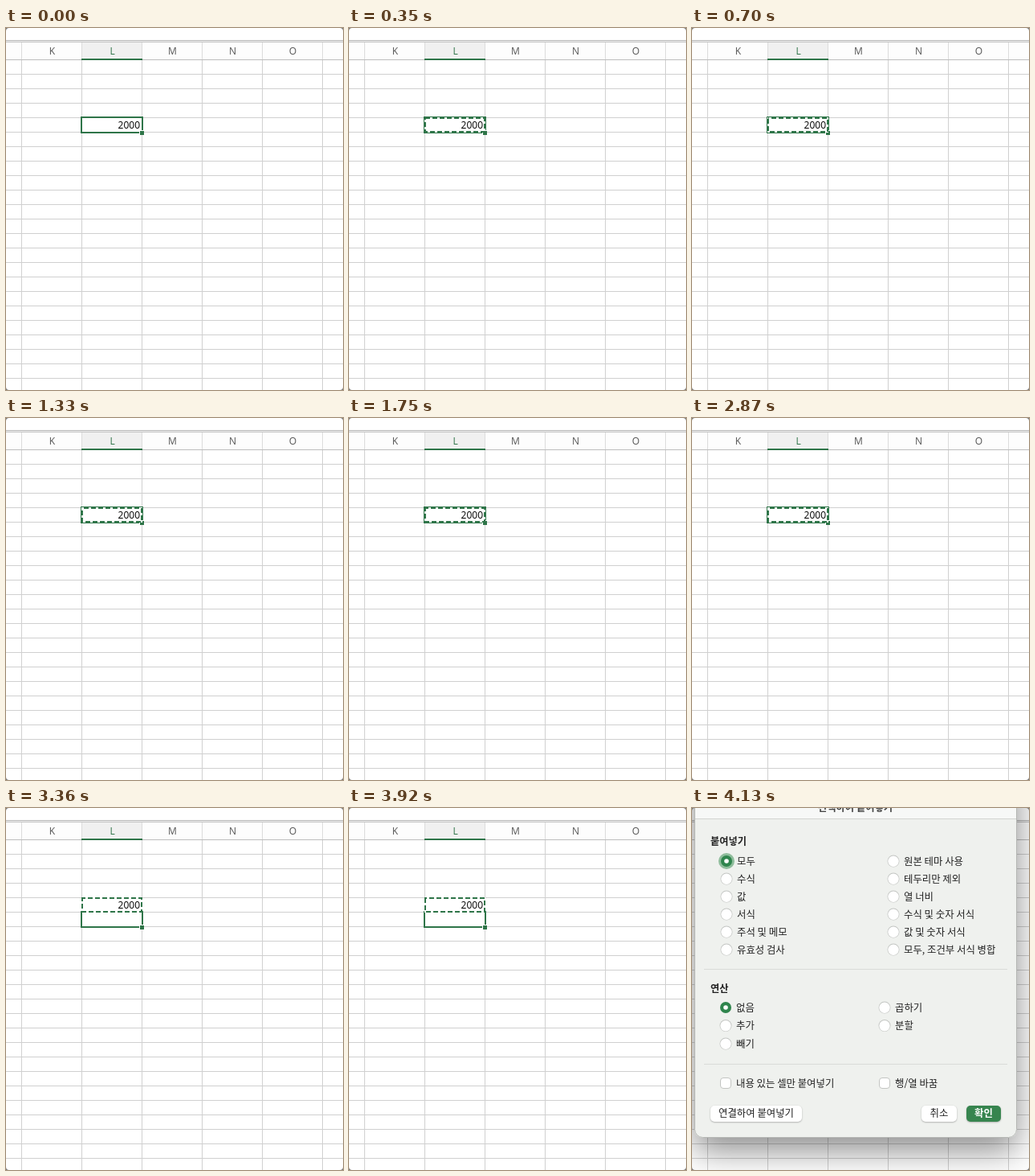
These frames come from a looping animation (420x450 px, 4.76 s). An HTML page with a canvas:

```html
<!DOCTYPE html>
<html lang="ko">
<head>
<meta charset="utf-8">
<style>
html, body { margin: 0; width: 100%; height: 100%; overflow: hidden; background: #fff; }
canvas { display: block; }
</style>
</head>
<body>
<canvas id="stage" width="420" height="450"></canvas>
<script>
const ctx = document.getElementById('stage').getContext('2d');
const LOOP = 4760, FRAME = 70;
const COPY_AT = 280, MOVE_AT = 3360, DIALOG_AT = 4130;
const GREEN = '#2f7549';
const LATIN = '"Open Sans", "Noto Sans", sans-serif';
const KOREAN = '"Noto Sans CJK KR", "Noto Sans CJK", sans-serif';

// Bursts of the marching border: start time, number of steps
const BURSTS = [
  [280, 4], [630, 4], [980, 4], [1330, 5], [1750, 4], [2100, 3],
  [2380, 4], [2730, 4], [3080, 4], [3430, 5], [3850, 2]
];

function rect(x, y, w, h, color) {
  ctx.fillStyle = color;
  ctx.fillRect(x, y, w, h);
}

function label(str, x, y, font, color, align = 'left') {
  ctx.font = font;
  ctx.fillStyle = color;
  ctx.textAlign = align;
  ctx.fillText(str, x, y);
}

function roundBox(x, y, w, h, r, fill, stroke) {
  ctx.beginPath();
  ctx.roundRect(x, y, w, h, r);
  ctx.fillStyle = fill;
  ctx.fill();
  if (stroke) {
    ctx.strokeStyle = stroke;
    ctx.lineWidth = 1;
    ctx.stroke();
  }
}

function disc(x, y, r, color) {
  ctx.beginPath();
  ctx.arc(x, y, r, 0, Math.PI * 2);
  ctx.fillStyle = color;
  ctx.fill();
}

function withShadow(color, blur, dy, draw) {
  ctx.save();
  ctx.shadowColor = color;
  ctx.shadowBlur = blur;
  ctx.shadowOffsetY = dy;
  draw();
  ctx.restore();
}

function drawSheet() {
  rect(0, 0, 420, 450, '#fff');
  rect(0, 15, 420, 1, '#b9b9b9');
  rect(0, 16, 420, 1, '#ededed');
  rect(0, 17, 420, 1, '#c4c4c4');
  rect(0, 18, 420, 21, '#fdfdfd');
  rect(95, 18, 74, 20, '#f0f0f0');
  for (let x = 19; x < 420; x += 75) {
    rect(x, 18, 1, 21, '#dcdcdc');
    rect(x, 40, 1, 410, '#d0d0d0');
  }
  rect(0, 39, 420, 1, '#bdbdbd');
  for (let y = 57; y < 450; y += 18) rect(0, y, 420, 1, '#d0d0d0');
  rect(94, 38, 76, 2, GREEN);
  [...'KLMNO'].forEach((c, i) =>
    label(c, 57.5 + i * 75, 33, '12px ' + LATIN, c === 'L' ? GREEN : '#555', 'center'));
  label('2000', 167, 125, '12px ' + LATIN, '#000', 'right');
}

function drawSelection(y) {
  ctx.strokeStyle = GREEN;
  ctx.lineWidth = 2;
  ctx.strokeRect(94, y, 76, 19);
  rect(166, y + 16, 6, 6, '#fff');
  rect(167, y + 17, 5, 5, GREEN);
}

function drawAnts(step) {
  ctx.lineWidth = 2;
  ctx.strokeStyle = '#fff';
  ctx.strokeRect(95, 112, 74, 17);
  ctx.strokeStyle = GREEN;
  ctx.setLineDash([6, 3]);
  ctx.lineDashOffset = -(step + 7);
  ctx.strokeRect(95, 112, 74, 17);
  ctx.setLineDash([]);
}

function drawCorners() {
  ctx.beginPath();
  ctx.rect(0, 0, 420, 450);
  ctx.roundRect(0, 0, 420, 450, 4);
  ctx.fillStyle = '#777';
  ctx.fill('evenodd');
}

function text(str, x, y, bold) {
  label(str, x, y + 4.5, (bold ? 'bold 12.2px ' : '12.4px ') + KOREAN, '#222');
}

function radio(x, y, str, on, focus) {
  if (focus) disc(x, y, 10, '#8fbd9c');
  if (on) {
    disc(x, y, 7, '#2f854d');
    disc(x, y, 2.8, '#fff');
  } else {
    disc(x, y, 7.5, '#c3c5c2');
    disc(x, y + 0.2, 6.7, '#fff');
  }
  text(str, x + 13, y);
}

function checkbox(x, y, str) {
  roundBox(x + 0.5, y - 6.5, 13, 13, 3.5, '#fff', '#c3c5c2');
  text(str, x + 20, y);
}

function button(x, w, str, fill, color, weight = '') {
  withShadow('rgba(0,0,0,.3)', 2, 0.7, () => roundBox(x, 370, w, 20, 5, fill));
  label(str, x + w / 2, 384.2, weight + '12.4px ' + KOREAN, color, 'center');
}

function drawDialog() {
  withShadow('rgba(0,0,0,.45)', 42, 16, () =>
    roundBox(3, -60, 402, 470, 10, '#eff1ee'));
  roundBox(3.5, -60, 401, 469.5, 10, '#eff1ee', '#b5b7b4');
  rect(4, 0, 400, 13, '#f7f8f7');
  rect(4, 13, 400, 1, '#d3d5d2');
  label('선택하여 붙여넣기', 203.5, 3.5, 'bold 12.3px ' + KOREAN, '#444', 'center');

  text('붙여넣기', 23, 41, true);
  ['모두', '수식', '값', '서식', '주석 및 메모', '유효성 검사']
    .forEach((s, i) => radio(43, 66 + i * 22, s, i === 0, i === 0));
  ['원본 테마 사용', '테두리만 제외', '열 너비', '수식 및 숫자 서식',
    '값 및 숫자 서식', '모두, 조건부 서식 병합']
    .forEach((s, i) => radio(251, 66 + i * 22, s));
  rect(15, 200, 378, 1, '#d9dbd8');

  text('연산', 23, 224, true);
  ['없음', '추가', '빼기'].forEach((s, i) => radio(42, 248 + i * 22.5, s, i === 0));
  ['곱하기', '분할'].forEach((s, i) => radio(240, 248 + i * 22.5, s));
  rect(15, 318, 378, 1, '#d9dbd8');

  checkbox(35, 342, '내용 있는 셀만 붙여넣기');
  checkbox(233, 342, '행/열 바꿈');
  button(23, 114, '연결하여 붙여넣기', '#fff', '#222');
  button(286, 44, '취소', '#fff', '#222');
  button(342, 43, '확인', '#37854f', '#fff', 'bold ');
}

function stepAt(t) {
  return BURSTS.reduce((sum, [start, n]) =>
    sum + Math.max(0, Math.min(n, Math.floor((t - start) / FRAME) + 1)), 0);
}

function render() {
  const t = performance.now() % LOOP;
  drawSheet();
  drawSelection(t < MOVE_AT ? 111 : 129);
  if (t >= COPY_AT) drawAnts(stepAt(t));
  if (t >= DIALOG_AT) drawDialog();
  drawCorners();
  requestAnimationFrame(render);
}
render();
</script>
</body>
</html>
```
